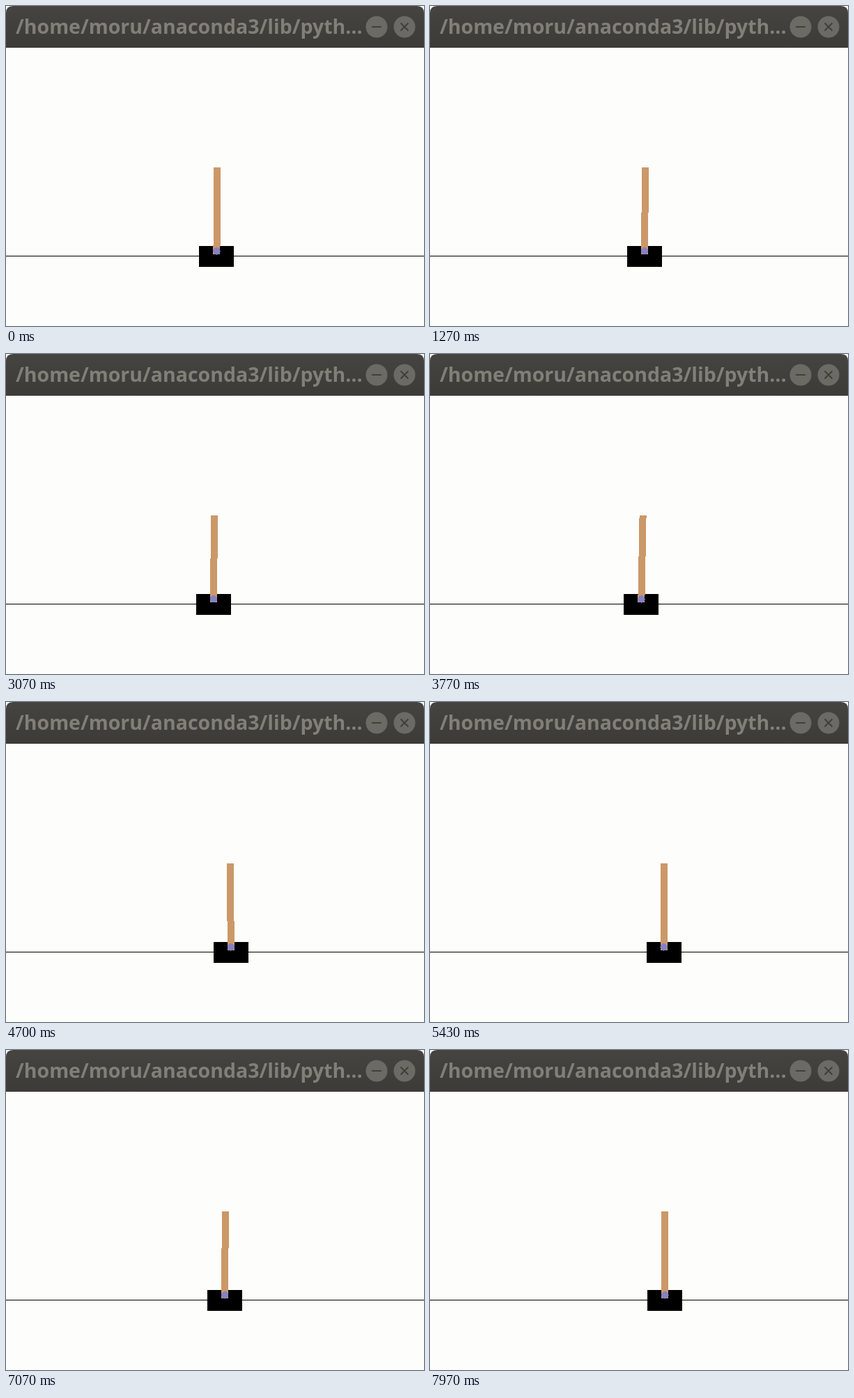
Recreate the animation shown at these times as an HTML page. Size 600 px wide and 460 px high, loop 8 s.

```html
<!DOCTYPE html>
<html lang="en">
<head>
<meta charset="utf-8">
<title>Cart pole</title>
<style>
  @property --x { syntax: "<length>"; inherits: true; initial-value: 302px; }
  @property --lean { syntax: "<angle>"; inherits: true; initial-value: 0deg; }

  html, body { margin: 0; width: 100%; height: 100%; overflow: hidden; background: #fdfdfc; }
  svg { display: block; width: 600px; height: 460px; }
  text { font: bold 28.5px "Noto Sans", "Open Sans", sans-serif; fill: #827f78; }
  .button { fill: #6c6a64; }
  .glyph { fill: none; stroke: #403f3b; stroke-width: 2; }

  .scene { shape-rendering: crispEdges; animation: balance 8s linear infinite; }
  .cart { transform: translateX(var(--x)); }
  .joint { transform: translate(var(--x), 352.4px); }
  .pole { transform: rotate(var(--lean)); }

  /* The cart drifts right in each episode and jumps back when a new one starts. */
  @keyframes balance {
    0%      { --x: 302.48px; --lean: 0.25deg; }
    15.875% { --x: 308px;    --lean: 0.53deg; }
    29.625% { --x: 315.8px;  --lean: -0.48deg; }
    38.37%  { --x: 320px;    --lean: 0deg; }
    38.38%  { --x: 298px;    --lean: 0.5deg; }
    47.125% { --x: 303.37px; --lean: 1.05deg; }
    58.75%  { --x: 322.8px;  --lean: -0.48deg; }
    77.5%   { --x: 349.2px;  --lean: 0.53deg; }
    79.99%  { --x: 352px;    --lean: 0.5deg; }
    80%     { --x: 297px;    --lean: 0.5deg; }
    100%    { --x: 338.2px;  --lean: -0.2deg; }
  }
</style>
</head>
<body>
<svg viewBox="0 0 600 460">
  <defs>
    <linearGradient id="bar" x2="0" y2="1">
      <stop stop-color="#454440"/>
      <stop offset="1" stop-color="#3c3b38"/>
    </linearGradient>
  </defs>
  <path d="M0 60V10Q0 0 10 0H590Q600 0 600 10V60Z" fill="url(#bar)"/>
  <text x="14" y="40">/home/moru/anaconda3/lib/pyth…</text>
  <circle class="button" cx="532" cy="30" r="15.5"/>
  <circle class="button" cx="572" cy="30" r="15.5"/>
  <path class="glyph" d="M525 30H539M566.5 24.5l11 11m0-11l-11 11"/>

  <g class="scene">
    <rect y="359" width="600" height="1"/>
    <rect class="cart" x="-25" y="345" width="50" height="30"/>
    <g class="joint">
      <rect class="pole" x="-5" y="-120" width="10" height="125" fill="#cb9868"/>
      <circle r="5.2" fill="#8681c4"/>
    </g>
  </g>
</svg>
</body>
</html>
```
